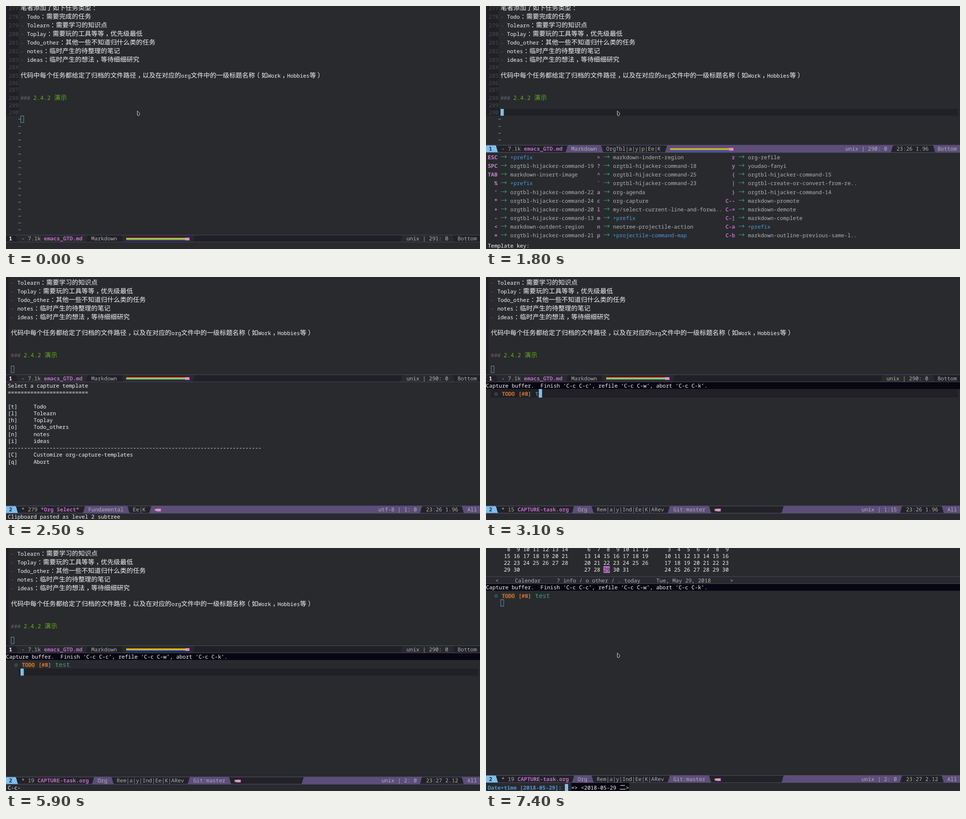
An HTML page for the animation above (8000 ms loop, 1045 by 536 pixels).

```html
<!DOCTYPE html>
<html lang="zh-CN">
<head>
<meta charset="utf-8">
<title>Org capture</title>
<style>
html, body { margin: 0; width: 100%; height: 100%; overflow: hidden; background: #282a2d; }
svg { display: block; width: 1045px; height: 536px; }
text {
  font: 11.8px "Noto Sans Mono", "DejaVu Sans Mono", monospace;
  white-space: pre;
  text-rendering: geometricPrecision;
}
.cjk { font: 14.16px "Noto Sans CJK SC", "Noto Sans CJK", sans-serif; }
.b { font-weight: 700; }
</style>
</head>
<body>
<svg id="stage" viewBox="0 0 1045 536"></svg>
<script>
const CELL = 7.08, LOOP = 8000;
const BG = '#282a2d', DARK = '#212026', HEAD = '#080612', PURPLE = '#5d4d7a', SKY = '#7ec0ee',
  WHITE = '#f5f5f5', GREY = '#b2b2b2', PINK = '#bc6ec5', BLUE = '#4f97d7', TEAL = '#36a783',
  GREEN = '#67b11d', ORANGE = '#dc752f', DIM = '#66676a', LNUM = '#474d57';

const esc = s => s.replace(/&/g, '&amp;').replace(/</g, '&lt;');
const col = n => 4 + n * CELL;
const rect = (x, y, w, h, fill) => `<rect x="${x}" y="${y}" width="${w}" height="${h}" fill="${fill}"/>`;
const box = (x, y) =>
  `<rect x="${x + .5}" y="${y + .5}" width="6.5" height="14.5" fill="none" stroke="${SKY}" stroke-width=".75"/>`;

// Text on a cell grid, y is the middle of the line; wide characters take two cells.
function text(x, y, str, fill = WHITE, bold = false, size = 11.8) {
  let out = '';
  for (const run of str.match(/[\x00-\x7f‘’]+|[，：）]|（|[^\x00-\x7f‘’，：（）]+/g) || []) {
    const wide = !/[\x00-\x7f‘’]/.test(run[0]);
    const shift = run === '（' ? -3.5 : /[，：）]/.test(run) ? 3.5 : 0;
    const cls = (wide ? 'cjk' : '') + (bold ? ' b' : '');
    const style = wide || size === 11.8 ? '' : ` style="font-size:${size}px"`;
    out += `<text x="${(x + shift).toFixed(2)}" y="${(y + 4.3).toFixed(2)}" class="${cls}" fill="${fill}"${style}>${esc(run)}</text>`;
    x += run.length * (wide ? 2 * CELL : size * .6);
  }
  return out;
}
const echo = s => text(4, 529, s);

const RAINBOW = ['#ff2a1a', '#ff9d00', '#fff000', '#3ad400', '#0a9cff', '#6a45f0'];
const progress = (x, y, len) =>
  RAINBOW.map((c, i) => rect(x, y + i, len, 1, c)).join('') + rect(x + len, y, 9.5, 6, '#e58ad8');

const BAR = 16.4;
const rules = (y, fill) => rect(0, y, 1045, .8, fill) + rect(0, y + BAR - .8, 1045, .8, fill);

// Mode line: segments of alternating colour with wavy edges.
function bar(y, on, num, info, name, items, edges, nyan) {
  const fills = on ? ['#222226', PURPLE] : [BG, DARK];
  const n = edges.length, mid = y + BAR / 2, end = y + BAR;
  let out = rect(0, y, 1045, BAR, on ? SKY : DARK);
  edges.forEach((s, i) => {
    const d = 4 * (i % 2 ? 1 : -1) * (i >= n - 2 ? -1 : 1);
    out += `<path d="M${s + d} ${y}C${s} ${y} ${s} ${end} ${s - d} ${end}H1045V${y}Z" fill="${fills[i % 2]}"/>`;
  });
  out += rules(y, PURPLE);
  out += text(6.5, mid, num, on ? '#222226' : WHITE, true) + text(34, mid, info, GREY);
  out += text(34 + info.length * CELL, mid, name, PINK, true);
  for (const [x, s] of items) out += text(x, mid, s, GREY);
  return out + progress(nyan[0], Math.round(mid - 2), nyan[1]);
}
const idleBar = (y, pos) => bar(y, false, '1', '- 7.1k ', 'emacs_GTD.md',
  [[188, 'Markdown'], [883, 'unix | ' + pos], [995.5, 'Bottom']],
  [24, 178, 256, 414, 872, 987], [265, 130]);
const mdBar = y => bar(y, true, '1', '- 7.1k ', 'emacs_GTD.md',
  [[188, 'Markdown'], [265, 'OrgTbl|a|y|p|Ee|K'], [792.5, 'unix | 290: 0'], [905, '23:26 1.96'], [995.5, 'Bottom']],
  [24, 178, 256, 397, 895, 988], [406, 130]);
const selectBar = () => bar(504.8, true, '2', '* 279 ', '*Org Select*',
  [[181.5, 'Fundamental'], [279.5, 'Ee|K'], [821, 'utf-8 | 1: 0'], [926, '23:26 1.96'], [1017, 'All']],
  [24, 172, 270, 318, 915, 1007], [328, 4]);
const captureBar = (y, size, pos, clock) => bar(y, true, '2', `* ${size} `, 'CAPTURE-task.org',
  [[202, 'Org'], [244, 'Rem|a|y|Ind|Ee|K|ARev'], [413, 'Git:master'], [828, 'unix | ' + pos], [926, clock], [1017, 'All']],
  [24, 192, 235, 403, 494, 654, 915, 1007], [504, 4]);

const ROWS = [5, 24, 43, 62, 81, 100, 119, 135, 154, 170, 185, 203, 219, 234.5];
const DOC = ['笔者添加了如下任务类型：', 'Todo：需要完成的任务', 'Tolearn：需要学习的知识点',
  'Toplay：需要玩的工具等等，优先级最低', 'Todo_other：其他一些不知道归什么类的任务',
  'notes：临时产生的待整理的笔记', 'ideas：临时产生的想法，等待细细研究', '',
  '代码中每个任务都给定了归档的文件路径，以及在对应的org文件中的一级标题名称（如Work，Hobbies等）'];

const doc = (x, dy) => DOC.map((s, i) => {
  const y = ROWS[i] + dy, item = i > 0 && i < 7;
  return item ? text(x, y, '-', DIM) + text(x + 2 * CELL, y, s) : text(x, y, s);
}).join('') + text(x, 203 + dy, '###', DIM) + text(x + 4 * CELL, 203 + dy, '2.4.2 演示', GREEN, false, 12.7);

const pointer = '<path d="M289.5 231.5L295.3 237.2L292.8 242L289.5 240.8Z" fill="#2c2c2c" stroke="#d8d8d8"/>';

function editor(tildes, focused) {
  let out = rect(0, 0, 28, 242, DARK);
  if (focused) out += rect(28, 227, 1013, 15, DARK) + rect(32, 227, 7.2, 15, SKY);
  ROWS.forEach((y, i) => out += text(6.3, y, String(277 + i), LNUM));
  for (let i = 0; i < tildes; i++) out += text(26.5, 250 + i * 15.25, '~', GREY);
  if (!focused) out += box(32, 242);
  return out + doc(32, 0) + pointer;
}

const KEYS = `ESC|+prefix  >|markdown-indent-region  r|org-refile
SPC|orgtbl-hijacker-command-19  ?|orgtbl-hijacker-command-18  y|youdao-fanyi
TAB|markdown-insert-image  ^|orgtbl-hijacker-command-25  {|orgtbl-hijacker-command-15
%|+prefix  \`|orgtbl-hijacker-command-23  ¦|orgtbl-create-or-convert-from-re..
'|orgtbl-hijacker-command-22  a|org-agenda  }|orgtbl-hijacker-command-14
*|orgtbl-hijacker-command-24  c|org-capture  C--|markdown-promote
+|orgtbl-hijacker-command-20  l|my/select-current-line-and-forwa..  C-=|markdown-demote
-|orgtbl-hijacker-command-13  m|+prefix  C-]|markdown-complete
<|markdown-outdent-region  n|neotree-projectile-action  C-a|+prefix
=|orgtbl-hijacker-command-21  p|+projectile-command-map  C-b|markdown-outline-previous-same-l..`;

const keyTable = KEYS.split('\n').map((line, r) => line.split('  ').map((cell, c) => {
  const [key, cmd] = cell.split('|'), end = [3, 35, 77][c], y = 334 + r * 19.05;
  return text(col(end - key.length), y, key.replace('¦', '|'), c ? PINK : '#cf86d2', true) +
    text(col(end + 1), y, '→', TEAL) + text(col(end + 4), y, cmd, cmd[0] === '+' ? BLUE : GREY);
}).join('')).join('');

const whichKey = msg => editor(4, true) + mdBar(306.8) + keyTable + echo(msg);

const upper = rect(0, 0, 6, 215, DARK) + doc(10.8, -30.5) + box(10.8, 196) + idleBar(215.2, '290: 0');

const MENU = ['Select a capture template', '='.repeat(25), '', '[t]     Todo', '[l]     Tolearn',
  '[h]     Toplay', '[o]     Todo_others', '[n]     notes', '[i]     ideas', '-'.repeat(79),
  '[C]     Customize org-capture-templates', '[q]     Abort'];
const select = msg => upper + MENU.map((s, i) => text(4, 239.5 + i * 15.25, s)).join('') +
  selectBar() + echo(msg);

// Capture buffer: header line and the heading below it.
function heading(y, typed, color, current) {
  const mid = y + 26;
  return rect(0, y, 1045, 15, HEAD) +
    text(0, y + 7.7, 'Capture buffer.  Finish ‘C-c C-c’, refile ‘C-c C-w’, abort ‘C-c C-k’.') +
    (current ? rect(11, y + 15, 1030, 19, DARK) : rect(35, y + 18.5, 28.5, 15, '#32322c')) +
    `<circle cx="22.2" cy="${mid + .3}" r="2.8" fill="none" stroke="${TEAL}"/>` +
    text(35, mid, 'TODO', ORANGE, true) + text(71.5, mid, '[#B]', ORANGE, true) +
    text(108.2, mid, typed, color, false, 13.7);
}

const popup = rect(131, 266, 135, 15.5, PURPLE) + rect(103, 281.5, 135, 30.5, '#34323e') +
  text(138, 274, 'test', GREY) +
  text(110, 289.5, 'test', GREY) + text(110 + 4 * CELL, 289.5, '1', '#9c90b8') +
  text(110, 305, 'test', GREY) + text(110 + 4 * CELL, 305, '_preprocessed', '#9c90b8');

function capture(n, { late = false, menu = false, next = false, msg = '' } = {}) {
  const bright = n > 1 && !next;
  const cursor = next
    ? rect(28, 266, 1013, 15.5, DARK) + rect(32, 266, 7.2, 15.5, SKY)
    : rect(108.2 + n * 8.22, 247, 7.2, 19, SKY);
  return upper + heading(232, 'test'.slice(0, n), bright ? '#4fd6ae' : TEAL, !next) + cursor +
    (menu ? popup : '') +
    captureBar(504.8, 14 + n + (next ? 1 : 0), next ? '2: 0' : '1:' + (14 + n), late ? '23:27 2.12' : '23:26 1.96') +
    echo(msg);
}

function calendar() {
  const months = [[5, 8, 30], [30, 6, 31], [55, 3, 30]];
  let out = rect(col(36), 40, 2 * CELL, 15, PINK);
  for (const [c, first, last] of months)
    for (let r = 0; r < 4; r++) for (let d = 0; d < 7; d++) {
      const day = first + r * 7 + d;
      if (day > last) break;
      const today = c === 30 && day === 29;
      out += text(col(c + d * 3), 2.2 + r * 15.25, String(day).padStart(2), today ? '#292b2e' : WHITE);
    }
  out += rules(62.7, PURPLE);
  const labels = [[21, '<'], [63.7, 'Calendar'], [156, '? info / o other / . today'],
    [375.5, 'Tue, May 29, 2018'], [538, '>']];
  for (const [x, s] of labels) out += text(x, 71.2, s, GREY);
  return out + heading(79.2, 'test', TEAL, false) + box(32, 113.5) + pointer +
    captureBar(501.4, 19, '2: 0', '23:27 2.12') +
    text(4, 528.7, 'Date+time [2018-05-29]:', BLUE, true) + rect(173.9, 520.5, 7.2, 15.5, SKY) +
    rect(188, 518, 127.5, 18, HEAD) + text(188, 528.7, '=> <2018-05-29 二>');
}

const idle = editor(17, false) + idleBar(504.8, '291: 0');
const active = editor(17, true) + mdBar(504.8);
const pasted = 'Clipboard pasted as level 2 subtree';
const done = msg => capture(4, { late: true, next: true, msg });

const scenes = [
  [0, idle],
  [400, active],
  [1100, active + echo('C-c-')],
  [1500, whichKey('C-c-')],
  [1800, whichKey('Template key:')],
  [2000, select('Template key:')],
  [2400, select(pasted)],
  [2600, capture(0, { msg: pasted })],
  [3100, capture(1)],
  [3200, capture(2)],
  [3300, capture(3)],
  [3400, capture(4)],
  [3700, capture(4, { menu: true })],
  [4200, capture(4, { menu: true, late: true })],
  [5100, capture(4, { late: true })],
  [5500, done('')],
  [5900, done('C-c-')],
  [6200, done('C-c C-g')],
  [6900, done('')],
  [7100, done('C-c-')],
  [7400, calendar()]
];

const stage = document.getElementById('stage');
let shown = -1;
function tick() {
  const t = performance.now() % LOOP;
  let i = scenes.length - 1;
  while (scenes[i][0] > t) i--;
  if (i !== shown) stage.innerHTML = scenes[shown = i][1];
  requestAnimationFrame(tick);
}
tick();
</script>
</body>
</html>
```
